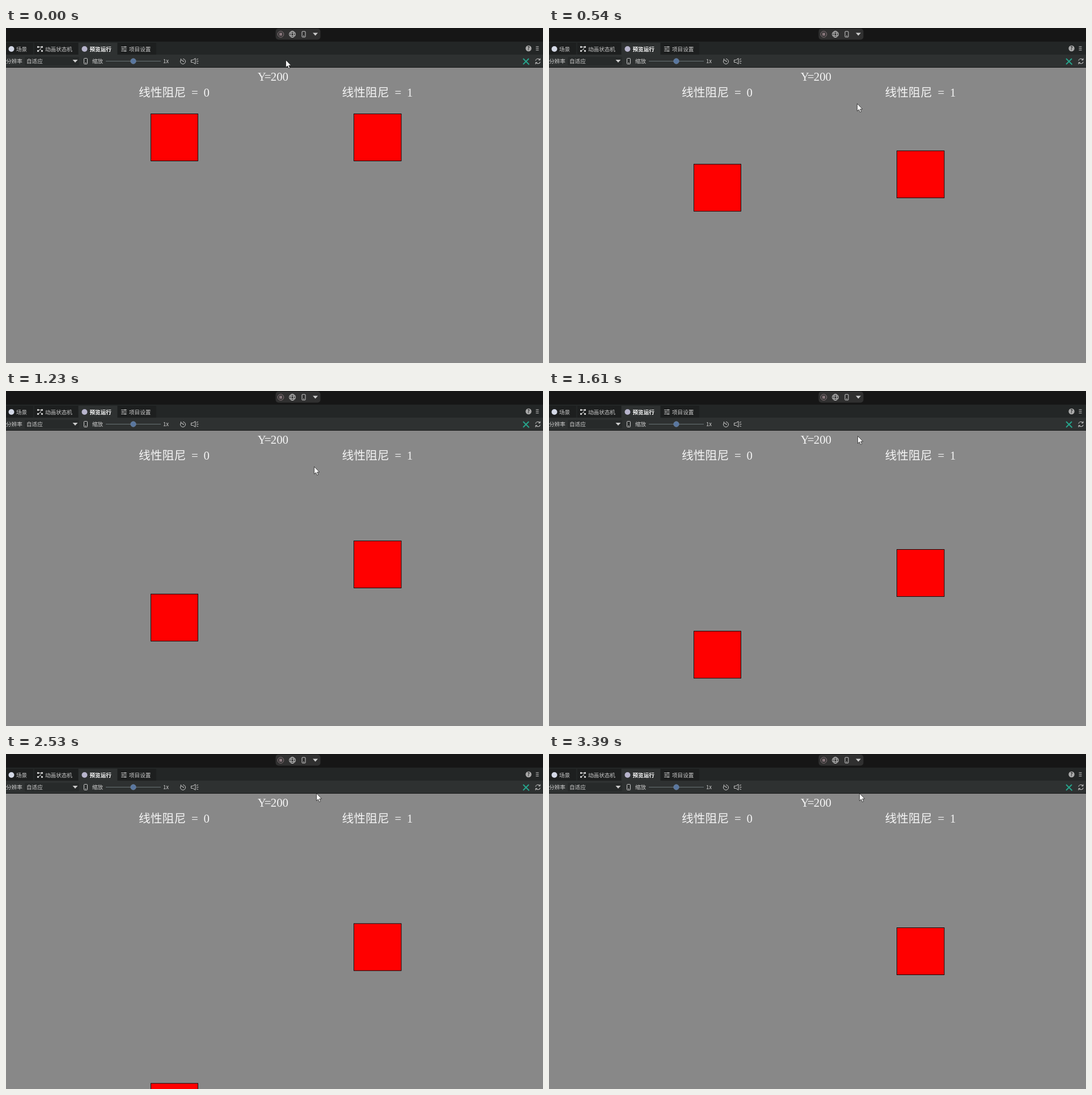
An HTML page that plays this animation: 947 px wide and 591 px high, repeating every 3470 ms.

```html
<!DOCTYPE html>
<html lang="zh">
<head>
<meta charset="utf-8">
<title>线性阻尼</title>
<style>
html, body { margin: 0; width: 947px; height: 591px; overflow: hidden; background: #888; }
svg { display: block; }
text { font-family: "Noto Sans CJK SC", "Noto Sans CJK", sans-serif; font-size: 9.6px; fill: #ccc; }
.label text { font-family: "Liberation Serif", "Noto Sans CJK SC", "Noto Sans CJK", serif; font-size: 20.8px; fill: #f4f4f4; }
.label .mid { text-anchor: middle; }
.tab { fill: #1d1f1f; }
.active { fill: #2e3131; }
.bold { font-weight: 700; fill: #fff; }
.icon { fill: none; stroke: #ccc; }
.solid { fill: #ccc; stroke: none; }
.box { fill: #f00; stroke: #000; stroke-width: .9; }
</style>
</head>
<body>
<svg width="947" height="591" viewBox="0 0 947 591">
  <defs>
    <g id="phone"><rect x="-3" y="-5" width="6" height="10" rx="1"/><path d="M-1 3h2"/></g>
    <path id="arrow" class="solid" d="M-4.5-2.5h9l-4.5 5z"/>
    <rect id="node" class="solid" width="3" height="3"/>
  </defs>

  <g id="labels" class="label"></g>
  <rect id="free" class="box" x="255.5" width="83" height="83"/>
  <rect id="damped" class="box" x="613.5" width="83.5" height="83"/>

  <!-- bars and tabs -->
  <rect width="947" height="24" fill="#161616"/>
  <rect y="24" width="947" height="23" fill="#232626"/>
  <rect class="tab" y="26" width="48" height="21"/>
  <rect class="tab" x="50" y="26" width="77" height="21"/>
  <rect class="tab" x="197" y="26" width="68" height="21"/>
  <rect class="active" x="128" y="26" width="68" height="21"/>
  <rect class="active" y="47" width="947" height="22"/>
  <rect y="69" width="947" height="1" fill="#191b1b"/>
  <rect x="33" y="51" width="96" height="15" rx="2" fill="#272a2a"/>
  <rect x="475.5" y="1" width="79" height="19.5" rx="5" fill="#303030"/>

  <text x="18" y="40.5">场景</text>
  <text x="69" y="40.5">动画状态机</text>
  <text x="147.5" y="40.5" class="bold">预览运行</text>
  <text x="217" y="40.5">项目设置</text>
  <text x="0" y="62">分辨率</text>
  <text x="36" y="62">自适应</text>
  <text x="152" y="62">缩放</text>
  <text x="277" y="62">1x</text>

  <circle cx="9.5" cy="37" r="5" fill="#d3d8e6"/>
  <circle cx="138.5" cy="37" r="5" fill="#b7b4cc"/>
  <circle cx="921.5" cy="36" r="5.2" fill="#aaa"/>
  <text x="921.5" y="39" text-anchor="middle" style="font-size:8.5px;font-weight:700;fill:#232626">?</text>

  <g class="icon">
    <!-- run buttons -->
    <circle cx="484.5" cy="11" r="5.3" stroke="#86757a"/>
    <rect x="482.5" y="9" width="4" height="4" fill="#86757a" stroke="#86757a"/>
    <circle cx="505" cy="11" r="5.4"/>
    <ellipse cx="505" cy="11" rx="2.5" ry="5.4"/>
    <path d="M500 9h10M500 13h10"/>
    <use href="#phone" x="525" y="11"/>
    <use href="#arrow" x="545.5" y="11"/>

    <!-- tabs -->
    <use href="#node" x="55" y="32"/><use href="#node" x="62" y="32"/>
    <use href="#node" x="55" y="39"/><use href="#node" x="62" y="39"/>
    <path d="M57 33.500h6M57 41l6-7M63 40l-3-3"/>
    <path d="M203 33.500h10M203 37h10M203 40.500h10M210 32v3M206 35.500v3M210 39v3"/>
    <path d="M934.500 33h5M934.500 36h5M934.500 39h5"/>

    <!-- toolbar -->
    <use href="#arrow" x="122" y="58.5"/>
    <use href="#phone" x="140.5" y="58.5"/>
    <path d="M176 58.500h97" stroke="#697376"/>
    <circle cx="224.5" cy="58.5" r="4.7" fill="#59769f" stroke="#7890ad" stroke-width=".7"/>
    <circle cx="312" cy="59" r="4.5" stroke-dasharray="24 5" transform="rotate(-90 312 59)"/>
    <path d="M308.500 54v3h3M312 57v2h2"/>
    <path d="M326.500 56.500h3l4.500-3v10l-4.500-3h-3zM336 55.500l3-1M336 58.500h3.500M336 61.500l3 1"/>
    <path d="M912 54l10.500 10.500M922 54l-10 10" stroke="#27a38b" stroke-width="2"/>
    <circle cx="938" cy="58.5" r="4.2" stroke-dasharray="10 3.2" transform="rotate(190 938 58.5)"/>
    <path d="M942 53.500v3h-3M934 64v-3h3"/>
  </g>

  <path id="cursor" d="M.5.5v13l3-2.700 2 4.700 2.200-.9-2-4.600h4z" fill="#fff" stroke="#111" stroke-width=".7"/>
</svg>
<script>
const LOOP = 3470, STEP = LOOP / 45, LAG = 18;
const START_Y = 151.5, SPEED = 0.17, REACH = 160.5;
const CELL = 10.4;
const $ = id => document.getElementById(id);

function addText(str, x, y, cls = '') {
  const el = document.createElementNS('http://www.w3.org/2000/svg', 'text');
  el.setAttribute('x', x);
  el.setAttribute('y', y);
  el.setAttribute('class', cls);
  el.textContent = str;
  $('labels').append(el);
}

// Half-width characters sit in a fixed grid
function addCells(str, x, y) {
  [...str].forEach((ch, i) => ch !== ' ' && addText(ch, x + (i + 0.5) * CELL, y, 'mid'));
}

function addCaption(x, damping) {
  addText('线性阻尼', x, 120.5);
  addCells(' = ' + damping, x + 8 * CELL, 120.5);
}

addCells('Y=200', 446, 93);
addCaption(234, 0);
addCaption(592.5, 1);

const ramp = (x, from, to) => Math.min(1, Math.max(0, (x - from) / (to - from)));

function draw(now) {
  const step = Math.floor((now % LOOP + LAG) / STEP) % 45;
  const time = Math.max(0, step * STEP - LAG);
  $('free').setAttribute('y', START_Y + SPEED * time);
  $('damped').setAttribute('y', START_Y + REACH * (1 - Math.exp(-time / 1000)));

  const down = ramp(step, 0, 4), up = ramp(step, 17, 21), rest = ramp(step, 21, 24);
  const x = Math.round(493 + 50 * down + up + 3 * rest);
  const y = Math.round(56 + 77 * down - 54 * up - 10 * rest);
  $('cursor').setAttribute('transform', `translate(${x} ${y})`);
}

const start = performance.now();
function tick() {
  draw(performance.now() - start);
  requestAnimationFrame(tick);
}
tick();
</script>
</body>
</html>
```
